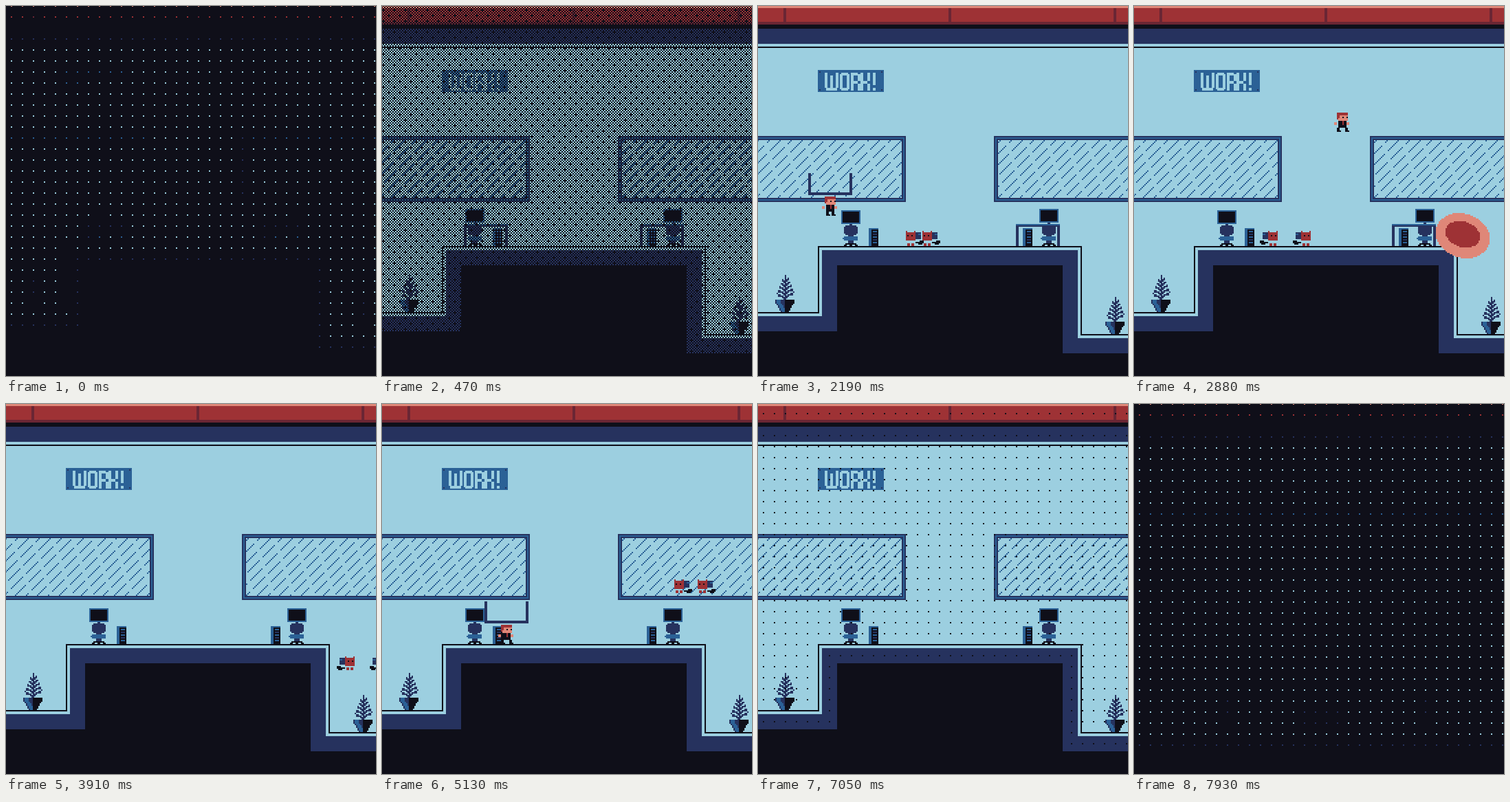
An HTML page with a canvas for the animation above (8 s loop, 538 by 538 pixels).

```html
<!DOCTYPE html>
<html lang="en">
<head>
<meta charset="utf-8">
<title>Office chase</title>
<style>
html, body { margin: 0; width: 100%; height: 100%; overflow: hidden; background: #0f0f19; }
canvas { display: block; width: 538px; height: 538px; }
</style>
</head>
<body>
<canvas id="stage" width="538" height="538" aria-label="WORK!"></canvas>
<script>
const LOOP = 8000, TICKS = 117, TICK = LOOP / TICKS, SIZE = 270;
const FLOOR = 175, PIT = 239, CAT_SPEED = 0.145;
const GRAB = 1780, THROW = 2600, HIT = 2800, REGRAB = 3200;
const DARK = '#0f0f19', NAVY = '#26325e', BLUE = '#2b6196', LIGHT = '#9ccfe0';
const RED = '#9e3235', MAROON = '#6a2634', PINK = '#df8778';

// Waypoints of the hero: time, x, foot height
const RUNS = [
  [[1000, 0, 145], [1300, 62, 139], [1480, 95, FLOOR], [GRAB, 82, FLOOR], [2060, 40, 160],
   [THROW, 92, FLOOR], [2880, 153, 90], [REGRAB, 204, FLOOR], [3540, 250, 96], [3720, 292, 120]],
  [[4430, 288, 185], [5070, 83, FLOOR], [5360, 120, FLOOR], [5660, 180, 110], [6180, 292, 184]]];

const out = document.getElementById('stage').getContext('2d');
const [low, tile] = [SIZE, 8].map(size => {
  const c = document.createElement('canvas');
  c.width = c.height = size;
  return c;
});
const g = low.getContext('2d'), tg = tile.getContext('2d');

const clamp = (v, a = 0, b = 1) => Math.max(a, Math.min(b, v));

function box(color, x, y, w = 1, h = 1) {
  g.fillStyle = color;
  g.fillRect(x, y, w, h);
}

// Runs a drawing in its own coordinates, mirrored within width w if asked
function place(x, y, paint, flip = false, w = 0) {
  g.save();
  g.translate(Math.round(x) + (flip ? w : 0), Math.round(y));
  if (flip) g.scale(-1, 1);
  paint();
  g.restore();
}

function ceiling() {
  box(PINK, 0, 0, SIZE, 2);
  box(RED, 0, 2, SIZE, 10);
  box(MAROON, 0, 12, SIZE, 2);
  for (let x = 19; x < SIZE; x += 120) box(MAROON, x, 2, 2, 12);
  box(DARK, 0, 14, SIZE, 3);
  box(NAVY, 0, 17, SIZE, 11);
  box(DARK, 0, 30, SIZE, 1);
}

// The stepped floor, d pixels inside its outline
function ground(color, d) {
  box(color, 0, 223 + d, 44 + d, 60);
  box(color, 44 + d, FLOOR + d, 192 - 2 * d, 100);
  box(color, 236 - d, PIT + d, 40 + d, 40);
}

function pane(x, w) {
  [NAVY, BLUE, NAVY, LIGHT].forEach((c, i) => box(c, x + i, 95 + i, w - 2 * i, 48 - 2 * i));
  for (let j = 98; j < 140; j++) {
    for (let i = x + 3; i < x + w - 3; i++) {
      const s = i + j - 2;
      if (s % 8 === 0 && (j + s / 8 * 5) % 11 > 1) box(BLUE, i, j);
    }
  }
}

function sign() {
  box(BLUE, 44, 47, 48, 16);
  for (const x of [45, 90]) for (const y of [48, 61]) box(NAVY, x, y);
  const post = (x, y = 0, h = 13) => box(LIGHT, x, 49 + y, 2, h);
  const beam = (x, y, w = 5) => box(LIGHT, x, 49 + y, w, 2);
  for (const x of [49, 53, 57]) post(x, x === 53 ? 2 : 0, 11);
  beam(50, 11, 3); beam(55, 11, 3);
  post(60, 1, 11); post(65, 1, 11); beam(61, 0); beam(61, 11);
  post(68); beam(68, 0); beam(68, 6); post(73, 1, 5); post(73, 8, 5);
  post(75); beam(75, 6); post(80, 0, 6); post(80, 8, 5);
  post(84, 0, 9); post(84, 11, 2);
}

function plant() {
  box(NAVY, 7, 0, 1, 18);
  for (const side of [-1, 1]) {
    for (let k = 0; k < 5; k++) {
      const y = 3 + 3 * k + (side < 0 ? 1 : 0), reach = Math.min(6, 2 + k);
      for (let i = 1; i <= reach; i++) box(NAVY, 7 + side * i, y - (i >> 1), 1, i % 3 ? 2 : 1);
    }
  }
  for (let j = 0; j < 9; j++) {
    const inset = j < 3 ? 0 : 1 + (j >> 1) - 1;
    box(NAVY, inset, 18 + j, 14 - 2 * inset, 1);
    box(BLUE, inset + 1, 18 + j, 3, 1);
    box(DARK, 7, 18 + j, 7 - inset, 1);
  }
}

function chair() {
  box(NAVY, 1, 1, 10, 5);
  box(NAVY, 2, 0, 8, 7);
  box(NAVY, 4, 7, 4, 6);
  box(BLUE, 1, 8, 10, 3);
  box(BLUE, 0, 9, 11, 1);
  box(DARK, 2, 13, 8, 1);
  for (const x of [1, 5, 9]) box(DARK, x, 14, 2, 1);
}

function tower() {
  box(BLUE, 0, 0, 7, 13);
  box(DARK, 2, 1, 5, 12);
  for (let y = 2; y < 11; y += 2) box(y % 4 ? BLUE : NAVY, 3, y, 3, 1);
}

function table(mid, top, flip) {
  place(mid - 16, top, () => {
    for (const x of [0, 30]) box(NAVY, x, 0, 2, 16);
    box(NAVY, 0, flip ? 14 : 0, 32, 2);
    if (!flip) box(BLUE, 0, 0, 32, 1);
  });
}

function desk(mid, seat, pc, whole) {
  place(seat - 6, 160, chair);
  place(seat - 7, whole ? 148 : 149, () => {
    box(BLUE, 0, 0, 14, 10);
    box(DARK, 1, 1, 12, 8);
    box(NAVY, 6, 10, 2, 2);
  });
  place(pc, 162, tower);
  if (whole) table(mid, 159, false);
}

function office(t) {
  box(LIGHT, 0, 0, SIZE, SIZE);
  ceiling();
  sign();
  pane(-10, 118);
  pane(172, 110);
  ground(DARK, 0);
  ground(LIGHT, 1);
  ground(NAVY, 3);
  ground(DARK, 14);
  desk(76, 68, 81, t < GRAB);
  desk(204, 212, 193, t < REGRAB);
  place(13, 196, plant);
  place(253, 212, plant);
}

// The next room, seen only as the first dots of its fade
function hall() {
  box(LIGHT, 0, 0, SIZE, SIZE);
  ceiling();
  box(BLUE, 0, 80, SIZE, 1);
  box(DARK, 0, PIT, SIZE, 1);
  box(NAVY, 0, 242, SIZE, 11);
  box(DARK, 0, 253, SIZE, 20);
  box(NAVY, 123, 222, 27, 15);
  for (const x of [-10, 61, 205]) place(x, 212, plant);
}

function hero(stride) {
  box(RED, 2, 0, 8, 5);
  box(PINK, 4, 2, 6, 4);
  box(PINK, 3, 4, 6, 2);
  for (const x of [6, 9]) box(DARK, x, 3);
  box(DARK, 3, 6, 6, 5);
  box(RED, 6, 6, 1, 3);
  for (const x of [0, 9]) box(PINK, x, 7, 2, 2);
  for (const side of [0, 1]) {
    const x = side ? 7 + stride : 3 - stride;
    box(DARK, x, 11, 2, 3);
    box(DARK, x + 1, 13, 2, 1);
  }
}

function cat(step) {
  for (const x of [6, 12]) box(RED, x, 0);
  box(RED, 6, 1, 7, 6);
  for (const x of [8, 11]) box(DARK, x, 3);
  box(NAVY, 2, 1, 4, 5);
  box(BLUE, 2, 2, 2, 1);
  box(DARK, 0, 7, 3, 2);
  box(DARK, 2, 8, 4, 1);
  box(DARK, 1, 9, 3, 1);
  for (const x of [7, 10]) box(RED, x, 9 - step, 2, 2);
}

// Cats run in, turn back at one spot and leave at the same speed
function chase(t, n) {
  const first = t < 4300;
  const hop = clamp((t - 1310) / 290), fall = Math.max(0, t - 3750) / 267;
  const foot = first
    ? FLOOR + (PIT - FLOOR) * (1 - Math.sin(hop * Math.PI / 2) + fall * fall)
    : Math.min(FLOOR, 139 + 36 * ((t - 5130) / 240) ** 2);
  const spots = first ? [[50.5, 2587], [68.5, 2545]] : [[147, 5585], [163, 5592]];
  for (const [x, turn] of spots) {
    place(x + CAT_SPEED * Math.abs(t - turn), Math.min(PIT, foot) - 11, () => cat(n % 2), t < turn, 13);
  }
}

function locate(path, t) {
  const i = path.findIndex((p, k) => k && t < p[0]);
  if (i < 1 || t < path[0][0]) return null;
  const [t0, x0, y0] = path[i - 1], [t1, x1, y1] = path[i];
  const u = (t - t0) / (t1 - t0), air = y0 !== y1;
  const arc = air ? 2e-4 * (t1 - t0) ** 2 * u * (1 - u) : 0;
  return { x: x0 + (x1 - x0) * u, y: y0 + (y1 - y0) * u - arc, left: x1 < x0, air };
}

function player(t, n) {
  for (const path of RUNS) {
    const p = locate(path, t);
    if (!p) continue;
    const stride = p.air ? Number(t > THROW) : n % 2;
    place(p.x - 5, p.y - 14, () => hero(stride), p.left, 11);
    if (t >= GRAB && t < THROW || t >= REGRAB) table(p.x + 1, p.y - 31, true);
  }
  if (t >= THROW && t < HIT) {
    const u = (t - THROW) / (HIT - THROW);
    table(92 + 146 * u, 143 + 17 * u, true);
  }
}

// A rough ellipse, tilted down to the right
function blob(color, cx, cy, rx, ry) {
  const tilt = 0.32, c = Math.cos(tilt), s = Math.sin(tilt);
  for (let j = -rx; j <= rx; j++) {
    for (let i = -rx; i <= rx; i++) {
      if (Math.hypot((i * c + j * s) / rx, (j * c - i * s) / ry) < 1) box(color, cx + i, cy + j);
    }
  }
}

function blast(t) {
  const u = (t - HIT) / 340;
  if (u < 0 || u >= 1) return;
  const r = Math.round(20 * Math.sin(Math.PI * (0.3 + 0.7 * u)));
  blob(PINK, 239, 167, r, r * 0.8);
  blob(RED, 239, 166, Math.round(r * 0.64), r * 0.46);
}

// Ordered 8x8 threshold, 0 to 63
function rank(x, y) {
  let v = 0;
  for (let b = 0; b < 3; b++) v = v * 4 + 2 * ((x ^ y) >> b & 1) + (y >> b & 1);
  return v;
}

function darkness(t) {
  if (t >= 7850) return 63;
  if (t >= 7040) return Math.min(64, 1 + 63 * (t - 7043) / 750);
  return clamp(63 * (880 - t) / 750, 0, 63);
}

function veil(level) {
  if (level <= 0) return;
  tg.clearRect(0, 0, 8, 8);
  tg.fillStyle = DARK;
  for (let y = 0; y < 8; y++) {
    for (let x = 0; x < 8; x++) {
      if (rank((x + 4) % 8, 7 - y) < level) tg.fillRect(x, y, 1, 1);
    }
  }
  g.fillStyle = g.createPattern(tile, 'repeat');
  g.fillRect(0, 0, SIZE, SIZE);
}

function shake(t, n) {
  const on = t > 2920 && t < 3200 || t > 6150 && t < 6420;
  return on ? [n % 2 ? 1 : -1, n % 4 < 2 ? 1 : -1] : [0, 0];
}

function draw(n) {
  const t = n * TICK;
  box(DARK, 0, 0, SIZE, SIZE);
  place(...shake(t, n), () => {
    if (t >= 7850) return hall();
    office(t);
    chase(t, n);
    player(t, n);
    blast(t);
  });
  veil(darkness(t));
  out.imageSmoothingEnabled = false;
  out.drawImage(low, -1, -1, 2 * SIZE, 2 * SIZE);
}

const start = performance.now();
let last = -1;
function loop() {
  const n = Math.floor((performance.now() - start) % LOOP / TICK + 0.12) % TICKS;
  if (n !== last) draw(last = n);
  requestAnimationFrame(loop);
}
loop();
</script>
</body>
</html>
```
